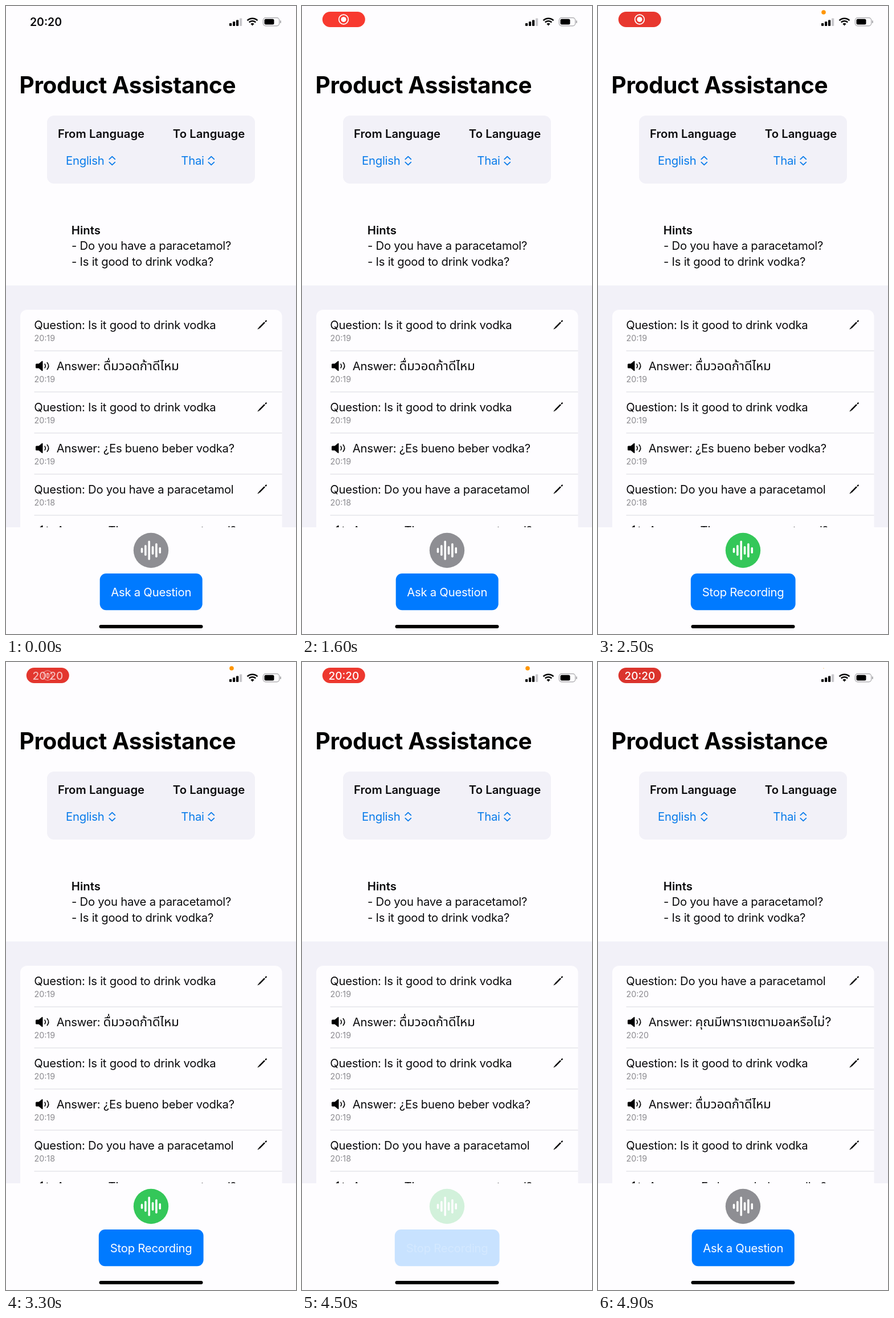
Write an HTML page that moves like this. It is 509 px wide and 1100 px high and loops after 5000 ms.

```html
<!DOCTYPE html>
<html lang="en">
<head>
<meta charset="utf-8">
<title>Product Assistance</title>
<style>
html, body { margin: 0; width: 100%; height: 100%; overflow: hidden; background: #fefdff; }
svg { display: block; width: 509px; height: 1100px; }
text { font: 400 20.3px Inter, "Noto Sans Thai Looped", "Noto Sans Thai", "Noto Sans", sans-serif;
  font-optical-sizing: none; letter-spacing: -0.24px; fill: #0b0b0d; }
.title { font-size: 40.5px; font-weight: 700; letter-spacing: -0.35px; fill: #000; }
.label { font-weight: 600; letter-spacing: 0.03px; }
.link { fill: #087bea; }
.stamp { font-size: 14.3px; letter-spacing: 0; fill: #8b8a8f; }
.thai { font-size: 22px; letter-spacing: 0; }
.clock { font-size: 19.5px; font-weight: 600; letter-spacing: 0; text-anchor: middle; }
.pillClock { font-size: 19px; font-weight: 500; }
.white { fill: #fff; }
.middle { text-anchor: middle; }
</style>
</head>
<body>
<svg id="stage" viewBox="0 0 509 1100"></svg>
<script>
const LOOP = 5000;
const PAPER = '#fefdff', PANEL = '#f2f1f8', INK = '#000';
const stage = document.getElementById('stage');

function add(parent, tag, attrs = {}, content) {
  const node = document.createElementNS('http://www.w3.org/2000/svg', tag);
  set(node, attrs);
  if (content) node.textContent = content;
  parent.appendChild(node);
  return node;
}
function set(node, attrs) {
  for (const key in attrs) node.setAttribute(key, attrs[key]);
}
const group = (parent, attrs) => add(parent, 'g', attrs);
const rect = (parent, x, y, width, height, rx, fill) =>
  add(parent, 'rect', { x, y, width, height, rx, fill });
const circle = (parent, cx, cy, r, fill) => add(parent, 'circle', { cx, cy, r, fill });
const label = (parent, x, y, content, cls = '') =>
  add(parent, 'text', { x, y, class: cls }, content);
const stroke = (parent, d, width, color = INK) =>
  add(parent, 'path', { d, fill: 'none', stroke: color, 'stroke-width': width,
    'stroke-linecap': 'round', 'stroke-linejoin': 'round' });

function drawStatusIcons() {
  for (let i = 0; i < 4; i++) {
    const h = 5 + i * 2.8;
    rect(stage, 392 + i * 6, 35 - h, 4.2, h, 1, i < 3 ? INK : '#c9c8cc');
  }
  add(stage, 'path', { d: 'M429.4 31.3 Q432.5 28.7 435.6 31.3 L432.5 34.5 Z', fill: INK });
  for (const r of [8.2, 12.7]) {
    const dx = r * 0.7, y = 34.5 - r * 0.72;
    stroke(stage, `M${432.5 - dx} ${y} A${r} ${r} 0 0 1 ${432.5 + dx} ${y}`, 2.7)
      .setAttribute('stroke-linecap', 'butt');
  }
  set(rect(stage, 451.3, 20.6, 28.4, 14.2, 4.5, 'none'), { stroke: '#a5a4a8', 'stroke-width': 1.2 });
  rect(stage, 453.5, 22.8, 17, 9.8, 2.5, INK);
  rect(stage, 481, 25.3, 1.8, 4.8, 0.9, '#a5a4a8');
}

function drawPicker(x, heading, value, valueX, arrowX) {
  label(stage, x, 231, heading, 'label');
  label(stage, valueX, 278, value, 'link');
  stroke(stage, `M${arrowX - 5} 268.3 l5 -4.6 l5 4.6 m-10 5.4 l5 4.6 l5 -4.6`, 1.8, '#087bea');
}

function drawPencil(parent, y) {
  stroke(parent, `M444.6 ${y + 5.4} L454 ${y - 4}`, 2.5).setAttribute('stroke-linecap', 'butt');
  stroke(parent, `M455.8 ${y - 5.8} l0.9 -0.9`, 2.4);
  add(parent, 'path', { d: `M443.5 ${y + 4.7} l1.8 1.8 l-4.1 1.8 Z`, fill: INK });
}

function drawSpeaker(parent, y) {
  add(parent, 'path', { d: `M53.5 ${y - 4} h4 l5.5 -4.6 q1.5 -0.8 1.5 0.8 v15.6 q0 1.6 -1.5 0.8
    l-5.5 -4.6 h-4 q-1.5 0 -1.5 -1.5 v-5 q0 -1.5 1.5 -1.5 Z`, fill: INK });
  stroke(parent, `M68 ${y - 3.3} q2.6 3.3 0 6.6 M72.2 ${y - 6} q5 6 0 12`, 1.6);
}

const history = [
  ['Do you have a paracetamol', 'คุณมีพาราเซตามอลหรือไม่?', '20:20', true],
  ['Is it good to drink vodka', 'ดื่มวอดก้าดีไหม', '20:19', true],
  ['Is it good to drink vodka', '¿Es bueno beber vodka?', '20:19', false],
  ['Do you have a paracetamol', '¿Tienes un paracetamol?', '20:18', false]
];

function drawHistory(entries) {
  const list = group(stage);
  entries.forEach(([question, answer, time, thai], i) => {
    const y = 558 + i * 144;
    label(list, 49.2, y + 8, 'Question: ' + question);
    label(list, 49.5, y + 29, time, 'stamp');
    drawPencil(list, y + 0.2);
    const reply = label(list, 88.8, y + 80, 'Answer: ');
    reply.style.whiteSpace = 'pre';
    add(reply, 'tspan', { class: thai ? 'thai' : '' }, answer);
    label(list, 49.5, y + 101, time, 'stamp');
    drawSpeaker(list, y + 72.5);
    for (const lineY of [45.4, 117.4]) rect(list, 49.5, y + lineY, 435, 1.2, 0, '#e0dfe4');
  });
  return list;
}

// Static screen
label(stage, 23.5, 152.5, 'Product Assistance', 'title');
drawStatusIcons();
rect(stage, 72, 192, 365, 119, 12, PANEL);
drawPicker(91, 'From Language', 'English', 105, 186.3);
drawPicker(292.8, 'To Language', 'Thai', 307.3, 360.3);
label(stage, 114.8, 400, 'Hints', 'label');
label(stage, 115, 427.4, '- Do you have a paracetamol?');
label(stage, 115, 454.8, '- Is it good to drink vodka?');
rect(stage, 0, 489.5, 509, 423.5, 0, PANEL);
rect(stage, 25, 532, 459.5, 400, 12, PAPER);
const oldList = drawHistory(history.slice(1));
const newList = drawHistory(history.slice(0, 3));
rect(stage, 0, 913, 509, 187, 0, PAPER);
rect(stage, 163.5, 1084, 182, 6.1, 3, INK);

// Recording controls
const emblem = group(stage);
const badge = circle(emblem, 254.5, 953.5, 30.7);
[9, 19, 34, 15, 25, 11].forEach((h, i) =>
  rect(emblem, 236.7 + i * 6.35, 953.5 - h / 2, 3.6, h, 1.8, '#fff'));
const button = rect(stage, 165, 994, 180, 64.2, 11, '#007aff');
const askText = label(stage, 254.7, 1034, 'Ask a Question', 'white middle');
const stopText = label(stage, 254.7, 1034, 'Stop Recording', 'white middle');

// Status bar clock, recording pill and microphone dot
const clock = label(stage, 70, 35.1, '20:20', 'clock');
const pill = group(stage);
const pillShape = rect(pill, 35.8, 10, 75, 27, 13.5);
const recordIcon = group(pill);
set(circle(recordIcon, 73, 23.5, 8.3, 'none'), { stroke: '#fff', 'stroke-width': 1.7 });
circle(recordIcon, 73, 23.5, 4.6, '#fff');
const pillClock = label(pill, 73.4, 30.6, '20:20', 'clock pillClock white');
const micDot = circle(stage, 396, 11, 0, '#ff9500');

const ramp = (t, from, to) => Math.min(1, Math.max(0, (t - from) / (to - from)));
const smooth = (t, from, to) => { const p = ramp(t, from, to); return p * p * (3 - 2 * p); };
const mix = (a, b, p) => a + (b - a) * p;
const mixColor = (a, b, p) => `rgb(${a.map((v, i) => Math.round(mix(v, b[i], p)))})`;

// Buttons dim at once when pressed and recover after release.
function pressOpacity(t, down, up) {
  return t < down ? 1 : mix(0.21, 1, smooth(t, up, up + 300));
}

function render(t) {
  const shown = smooth(t, 0, 300);
  set(clock, { opacity: 1 - shown });
  set(pill, { opacity: shown });
  const pulse = (1 - Math.cos((t - 850) / 2100 * 2 * Math.PI)) / 2;
  set(pillShape, { fill: mixColor([217, 52, 45], [255, 59, 48], pulse) });
  const timeShown = ramp(t, 3100, 3400);
  set(recordIcon, { opacity: 1 - timeShown });
  set(pillClock, { opacity: timeShown });
  set(micDot, { r: 3.8 * smooth(t, 2100, 2400) * (1 - ramp(t, 4600, 4960)) });

  const recording = smooth(t, 1900, 2220) * (1 - smooth(t, 4500, 4820));
  const opacity = pressOpacity(t, 1900, 1900) * pressOpacity(t, 4400, 4500);
  set(emblem, { opacity });
  set(badge, { fill: mixColor([142, 142, 147], [52, 199, 89], recording) });
  const width = mix(180, 183.8, recording);
  set(button, { x: 254.7 - width / 2, width, opacity });
  set(askText, { opacity: opacity * (1 - recording) });
  set(stopText, { opacity: opacity * recording });

  const answered = t >= 4700;
  set(oldList, { visibility: answered ? 'hidden' : 'visible' });
  set(newList, { visibility: answered ? 'visible' : 'hidden' });
}

const start = performance.now();
function tick() {
  render((performance.now() - start) % LOOP);
  requestAnimationFrame(tick);
}
tick();
</script>
</body>
</html>
```
